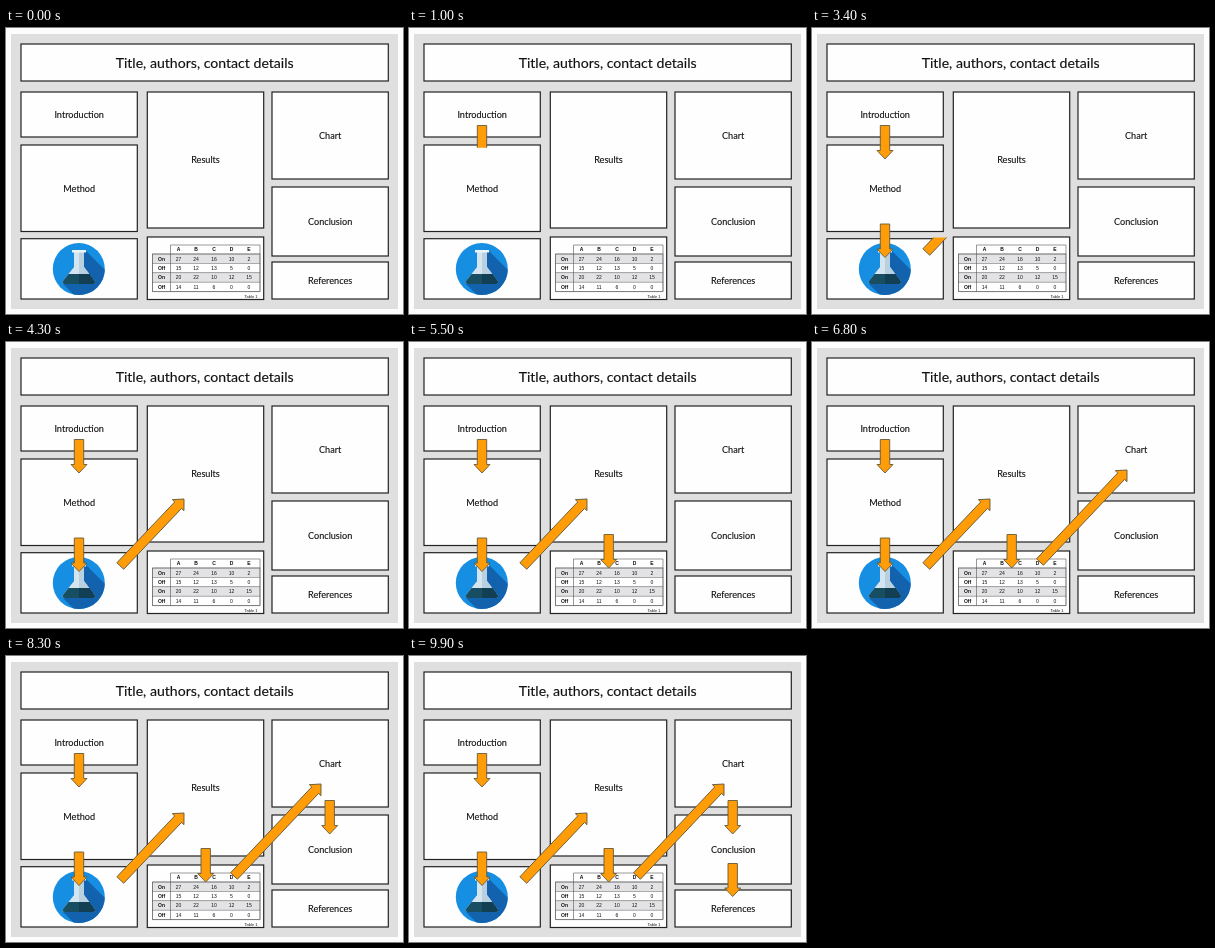
Recreate the animation shown at these times as an HTML page. Size 397 by 286 pixels, loop 10 s.

```html
<!DOCTYPE html>
<html lang="en">
<head>
<meta charset="utf-8">
<title>Poster reading order</title>
<style>
  html, body { margin: 0; width: 100%; height: 100%; overflow: hidden; background: #fdfdfd; }
  svg { display: block; width: 397px; height: 286px; }
  text { text-anchor: middle; fill: #111; }
  .label { font: 9.15px Lato, Carlito, sans-serif; stroke: #111; stroke-width: .12px; }
  .title { font: 14.1px Lato, Carlito, sans-serif; stroke: #111; stroke-width: .15px; }
  .cell { font: 5px "Liberation Sans", Arial, sans-serif; }
  .bold { font-weight: bold; }
</style>
</head>
<body>
<svg id="stage" viewBox="0 0 397 286"></svg>
<script>
const LOOP = 10000, STEP = 100, WIPE = 750;
const stage = document.getElementById('stage');

function add(parent, tag, attrs, content) {
  const node = document.createElementNS('http://www.w3.org/2000/svg', tag);
  for (const key in attrs) node.setAttribute(key, attrs[key]);
  if (content !== undefined) node.textContent = content;
  parent.appendChild(node);
  return node;
}
const rect = (x1, y1, x2, y2, attrs) =>
  add(stage, 'rect', { x: x1, y: y1, width: x2 - x1, height: y2 - y1, ...attrs });
const label = (x, y, words, cls) => add(stage, 'text', { x, y, class: cls }, words);
const path = (parent, d, attrs) => add(parent, 'path', { d, ...attrs });

function panel(x1, y1, x2, y2, words, baseline, cls = 'label') {
  rect(x1, y1, x2, y2, { fill: '#fefefe', stroke: '#222', 'stroke-width': 1.2 });
  if (words) label((x1 + x2) / 2, baseline, words, cls);
}

function drawFlask() {
  const clip = add(add(stage, 'defs', {}), 'clipPath', { id: 'disc' });
  const disc = { cx: 72.8, cy: 241, r: 26 };
  add(clip, 'circle', disc);
  add(stage, 'circle', { ...disc, fill: '#168fe3' });
  const g = add(stage, 'g', { 'clip-path': 'url(#disc)' });
  path(g, 'M79 222 L109 252 V287 H88 L57 256 L67 240Z', { fill: '#1262ae' });
  path(g, 'M68 224 H78 V239 L88.5 253 Q90 256 86.5 256 H59 Q55.5 256 57 253 L68 239Z', { fill: '#d5e5ef' });
  path(g, 'M73 224 H78 V239 L88.5 253 Q90 256 86.5 256 H73Z', { fill: '#b8d0df' });
  path(g, 'M62.5 246 H83.5 L88.5 253 Q90 256 86.5 256 H59 Q55.5 256 57 253Z', { fill: '#174e62' });
  path(g, 'M73 246 H83.5 L88.5 253 Q90 256 86.5 256 H73Z', { fill: '#123f53' });
  path(g, 'M66 222 H80 V224.5 H66Z', { fill: '#edf4f7' });
}

function drawTable() {
  const columns = [172.5, 190, 208, 225.5, 243];
  const rows = [['On', 27, 24, 16, 10, 2], ['Off', 15, 12, 13, 5, 0],
                ['On', 20, 22, 10, 12, 15], ['Off', 14, 11, 6, 0, 0]];
  const top = 226, height = 9.4;
  const line = { fill: 'none', stroke: '#555', 'stroke-width': .6 };
  columns.forEach((x, i) => label(x, 223.4, 'ABCDE'[i], 'cell bold'));
  rows.forEach(([name, ...values], i) => {
    const y = top + i * height;
    rect(146.5, y, 254, y + height, { ...line, stroke: '#888', fill: i % 2 ? '#fefefe' : '#e3e3e6' });
    label(155.5, y + 6.6, name, 'cell bold');
    values.forEach((value, j) => label(columns[j], y + 6.6, value, 'cell'));
  });
  path(stage, 'M164.5 263.6 V217 H254 V263.6 H146.5 V226 H254', line);
  label(245, 269.5, 'Table 1', 'cell').style.fontSize = '4px';
}

const arrows = [];
function arrow(start, x1, y1, x2, y2) {
  const id = 'wipe' + arrows.length;
  const clip = add(add(stage, 'defs', {}), 'clipPath', { id });
  const mask = add(clip, 'rect', { x: 0, width: 397 });
  const group = add(stage, 'g', { 'clip-path': `url(#${id})` });
  const length = Math.hypot(x2 - x1, y2 - y1);
  const angle = Math.atan2(y2 - y1, x2 - x1) * 180 / Math.PI;
  const neck = length - 8.5;
  path(group, `M0 -4.7 H${neck} V-8 L${length} 0 L${neck} 8 V4.7 H0Z`, {
    transform: `translate(${x1} ${y1}) rotate(${angle})`,
    fill: '#ff9c08', stroke: '#665c38', 'stroke-width': .9
  });
  const upward = y2 < y1;
  const pad = upward ? 5 : 1;
  arrows.push({ start, group, mask, upward, top: Math.min(y1, y2) - 1, bottom: Math.max(y1, y2) + pad });
}

rect(5, 6, 392, 281, { fill: '#dfdfe0' });
panel(15, 16, 382.3, 53, 'Title, authors, contact details', 39.7, 'title');
panel(15, 64, 131.3, 109, 'Introduction', 90);
panel(15, 117, 131.3, 203.5, 'Method', 163.5);
panel(15, 210.7, 131.3, 271);
panel(141.3, 64, 257.7, 200, 'Results', 135.3);
panel(141.3, 209, 257.7, 271.5);
panel(266, 64, 382.3, 151, 'Chart', 110.5);
panel(266, 159, 382.3, 228, 'Conclusion', 196.8);
panel(266, 234, 382.3, 271, 'References', 255.8);
drawFlask();
drawTable();

arrow(510, 73, 97.5, 73, 131);
arrow(1880, 73, 196, 73, 229.5);
arrow(3200, 114.3, 224, 178, 157);
arrow(4600, 199.7, 192.5, 199.7, 226);
arrow(5985, 228, 220, 315, 128);
arrow(7350, 323.7, 144.5, 323.7, 178);
arrow(8720, 323.7, 207.5, 323.7, 240.5);

function render(time) {
  const t = Math.floor((time % LOOP) / STEP) * STEP;
  for (const { start, group, mask, upward, top, bottom } of arrows) {
    const shown = Math.min(1, Math.max(0, (t - start) / WIPE));
    const height = (bottom - top) * shown;
    group.style.display = shown ? '' : 'none';
    mask.setAttribute('y', upward ? bottom - height : top);
    mask.setAttribute('height', height);
  }
}

const origin = performance.now();
function tick() {
  render(performance.now() - origin);
  requestAnimationFrame(tick);
}
tick();
</script>
</body>
</html>
```
